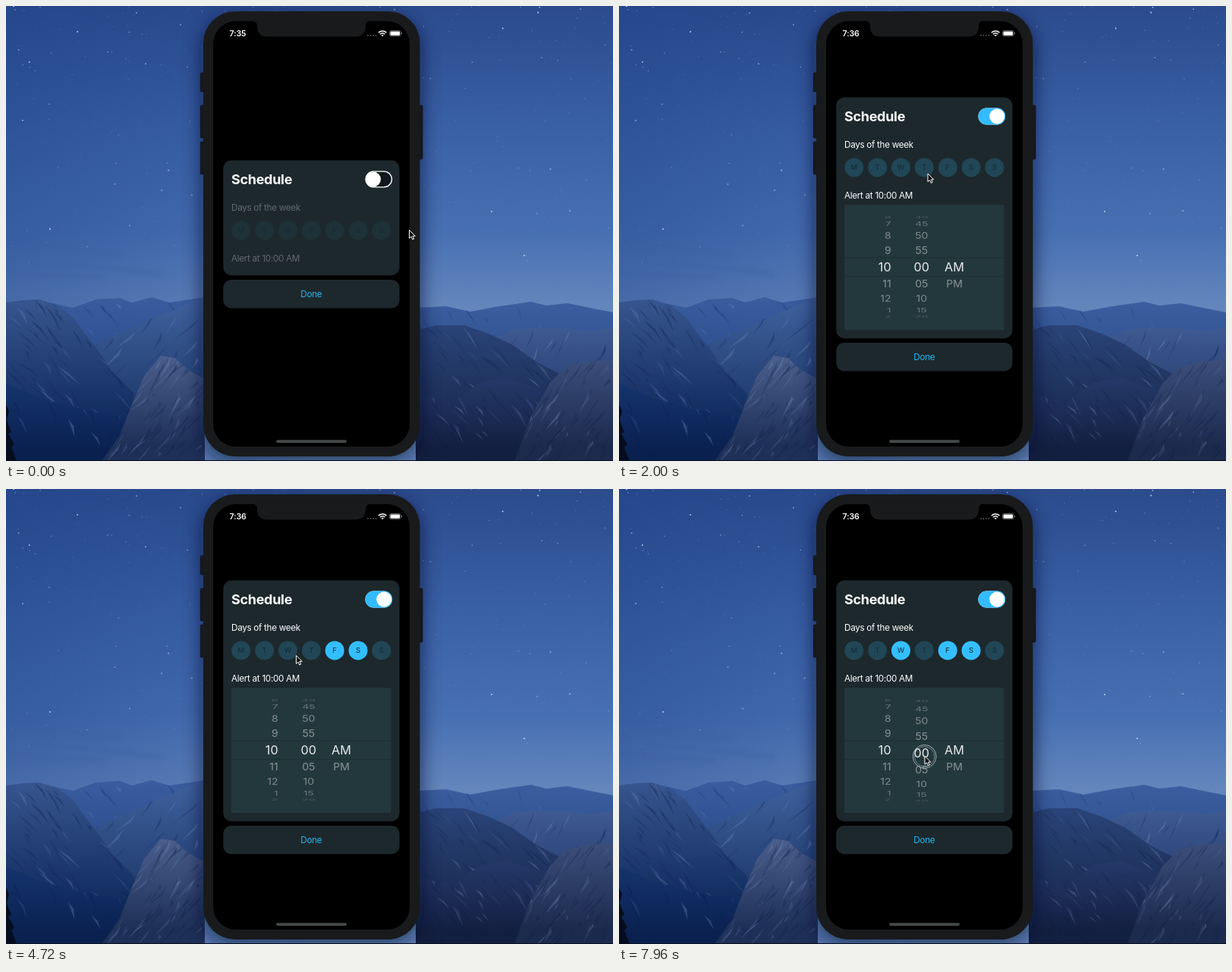
These frames come from a looping animation (800 by 600 pixels, 8 s). An HTML page:

```html
<!DOCTYPE html>
<html lang="en">
<head>
<meta charset="utf-8">
<title>Schedule card</title>
<style>
  html, body { margin: 0; width: 100%; height: 100%; overflow: hidden; background: #000; }
  svg { display: block; width: 100%; height: 100%; }
  text { font-family: Inter, "Open Sans", sans-serif; }
  .body { font-size: 11.7px; letter-spacing: -.3px; }
  .mid { text-anchor: middle; }
</style>
</head>
<body>
<svg viewBox="0 0 800 600">
  <defs>
    <linearGradient id="sky" x2="0" y2="1">
      <stop offset="0" stop-color="#2b4b8d"/>
      <stop offset=".28" stop-color="#3a61a6"/>
      <stop offset=".5" stop-color="#4770b2"/>
      <stop offset=".66" stop-color="#6486bd"/>
    </linearGradient>
    <linearGradient id="dusk">
      <stop offset="0" stop-color="#1d4088" stop-opacity=".4"/>
      <stop offset=".5" stop-color="#1d4088" stop-opacity="0"/>
    </linearGradient>
    <filter id="soft" x="-30%" y="-30%" width="160%" height="160%"><feGaussianBlur stdDeviation="12"/></filter>
    <filter id="haze" x="-30%" y="-100%" width="160%" height="300%"><feGaussianBlur stdDeviation="3"/></filter>
    <clipPath id="pickClip"><rect id="pickClipBox" x="297" y="141.5" width="210.5" height="165" rx="3"/></clipPath>
  </defs>

  <rect width="800" height="600" fill="url(#sky)"/>
  <rect width="800" height="600" fill="url(#dusk)"/>
  <g id="stars" fill="#dce8fb"></g>
  <g fill="none" stroke="#3c5f9f" stroke-width="5" opacity=".5" filter="url(#haze)">
    <path d="M0 316Q60 314 150 330M40 338Q120 342 205 354M0 350Q60 356 130 357"/>
  </g>
  <g id="hills"></g>
  <path d="M0 526l4 8-3 12 6 16-4 2 8 14-4 4 7 18H0Z" fill="#060d1f"/>
  <rect y="599" width="800" height="1" fill="#0a1020"/>

  <rect x="257" y="14" width="291" height="588" rx="44" fill="#04102c" opacity=".6" filter="url(#soft)"/>
  <g fill="#17191c" stroke="#0b0c0e" stroke-width=".6">
    <rect x="256.3" y="88" width="8" height="25" rx="1.5"/>
    <rect x="256.3" y="131" width="8" height="43" rx="1.5"/>
    <rect x="256.3" y="179" width="8" height="43" rx="1.5"/>
    <rect x="541" y="131" width="8" height="71" rx="1.5"/>
  </g>
  <rect x="260" y="7" width="285.5" height="587" rx="42" fill="#191a1b"/>
  <rect x="273" y="20" width="259" height="561" rx="30"/>
  <path d="M325 19.5q6 1 6 7q0 14 14 14H460q14 0 14-14q0-6 6-7Z" fill="#191a1b"/>

  <text id="clock" x="294.5" y="39.8" fill="#fff" font-size="10.6" font-weight="600" letter-spacing="-.1"></text>
  <g fill="#666b6d">
    <circle cx="477" cy="38.8" r=".9"/><circle cx="480.5" cy="38.8" r=".9"/>
    <circle cx="484" cy="38.8" r=".9"/><circle cx="487.5" cy="38.8" r=".9"/>
  </g>
  <g fill="none" stroke="#fff" stroke-width="1.5">
    <path d="M491 35.1a7.3 7.3 0 0 1 10.4 0M493 37.2a4.5 4.5 0 0 1 6.4 0"/>
    <path d="M494.6 38.6a2.3 2.3 0 0 1 3.2 0L496.2 40.3Z" fill="#fff" stroke="none"/>
  </g>
  <rect x="505.5" y="32.4" width="14.6" height="7.4" rx="2.2" fill="none" stroke="#8a8d8e" stroke-width=".7"/>
  <rect x="506.5" y="33.4" width="12.6" height="5.4" rx="1.3" fill="#fff"/>
  <rect x="520.9" y="34.9" width="1" height="2.4" rx=".5" fill="#8a8d8e"/>
  <rect x="356" y="572.3" width="93" height="3.6" rx="1.8" fill="#46494a"/>

  <g id="card">
    <rect id="panel" x="286.3" width="232.3" rx="10.5" fill="#1d282c"/>
    <text x="297" y="31.4" fill="#fff" font-size="18" font-weight="700" letter-spacing="-.3">Schedule</text>
    <rect x="474.1" y="14.6" width="34.4" height="20.6" rx="10.3" fill="#10181b" stroke="#fff" stroke-width="1.3"/>
    <rect id="track" x="473.5" y="14" width="35.6" height="21.8" rx="10.9" fill="#33bbff"/>
    <circle id="knob" cy="24.9" r="10" fill="#fff"/>
    <g id="content">
      <text class="body" x="297" y="66.7" fill="#fff">Days of the week</text>
      <g id="days"></g>
      <text class="body" x="297" y="133" fill="#fff">Alert at 10:00 AM</text>
    </g>
    <g id="picker" clip-path="url(#pickClip)">
      <rect x="297" y="141.5" width="210.5" height="165" fill="#23383d"/>
      <g id="wheel">
        <path d="M297 211.5H507.5M297 236H507.5" stroke="#1b2c30" stroke-width=".8"/>
      </g>
    </g>
    <g id="done">
      <rect x="286.3" width="232.3" height="37.4" rx="10.5" fill="#1d282c"/>
      <text class="body mid" x="402.3" y="22.9" fill="#22b8f6">Done</text>
    </g>
  </g>

  <g id="ring" fill="none" stroke="#c9d2d4" stroke-width="1">
    <circle r="15.4" opacity=".75"/>
    <circle r="13.2" opacity=".5"/>
  </g>
  <path id="cursor" d="M0 0V10.8L2.6 8.5 4.3 12.4 6.2 11.6 4.5 7.8H7.8Z" fill="#0b0b0b" stroke="#fff" stroke-width="1" stroke-linejoin="round"/>
</svg>
<script>
const LOOP = 8000;
const $ = id => document.getElementById(id);
const clamp = v => Math.max(0, Math.min(1, v));
const smooth = v => { v = clamp(v); return v * v * (3 - 2 * v); };
const lerp = (a, b, u) => a + (b - a) * u;
const phase = (t, start, dur) => smooth((t - start) / dur);

function add(parent, tag, attrs, text) {
  const el = document.createElementNS("http://www.w3.org/2000/svg", tag);
  for (const k in attrs) el.setAttribute(k, attrs[k]);
  if (text) el.textContent = text;
  return parent.appendChild(el);
}

let seed = 41;
const rnd = () => (seed = seed * 16807 % 2147483647) / 2147483647;

// Scenery
for (let i = 0; i < 430; i++) {
  const y = 340 * Math.pow(rnd(), 1.35), big = rnd() ** 5;
  add($("stars"), "circle", {
    cx: (800 * rnd()).toFixed(1), cy: y.toFixed(1), r: (.45 + .75 * big).toFixed(2),
    opacity: ((.25 + .35 * rnd() + .4 * big) * (1 - y / 560)).toFixed(2)
  });
}
for (const [cx, cy] of [[58, 294], [683, 329], [640, 271]])
  add($("stars"), "circle", { cx, cy, r: 1, opacity: .8 });

// Each hill: outline, top and bottom colour, streak count, streak slant
const hills = [
  ["0,392 45,388 88,398 118,387 150,385 166,391 192,384 215,391 262,384 262,600 0,600", "#3a5d9f", "#1d3c7a", 30, .6],
  ["540,398 580,396 612,403 650,396 692,390 712,395 740,392 800,404 800,600 540,600", "#3b5e9f", "#223f79", 30, .5],
  ["96,458 130,440 168,424 196,410 226,399 262,383 262,600 140,600", "#40629f", "#16305f", 60, -.9],
  ["640,440 668,427 700,424 740,425 770,429 800,424 800,600 640,600", "#3e5a92", "#1b2f5d", 45, -.7],
  ["0,391 22,388 44,387 70,396 88,410 104,432 124,458 140,482 168,510 190,600 0,600", "#37558f", "#0b2556", 120, .8],
  ["540,428 566,421 604,421 636,432 668,447 700,470 740,490 740,600 540,600", "#2a4478", "#152549", 90, .8],
  ["0,498 40,515 84,528 130,538 170,545 170,600 0,600", "#15346d", "#0a2150", 20, .4],
  ["540,512 590,522 626,496 660,490 700,504 730,520 760,600 540,600", "#25396a", "#131f40", 70, .7],
  ["690,545 716,498 738,476 766,469 800,466 800,600 670,600", "#3c4f7b", "#1c2a4d", 80, -.8],
  ["126,600 150,566 168,520 182,488 204,461 222,464 240,480 262,492 262,600", "#4a5f8d", "#1e3057", 110, -.9]
];
hills.forEach(([points, top, bottom, count, slant], i) => {
  const g = $("hills"), xy = points.split(" ").map(p => p.split(",").map(Number));
  const xs = xy.map(p => p[0]), x0 = Math.min(...xs), x1 = Math.max(...xs);
  const y0 = Math.min(...xy.map(p => p[1]));
  const grad = add(g, "linearGradient", { id: "hill" + i, x2: 0, y2: 1 });
  add(grad, "stop", { offset: 0, "stop-color": top });
  add(grad, "stop", { offset: .85, "stop-color": bottom });
  add(add(g, "clipPath", { id: "edge" + i }), "polygon", { points });
  add(g, "polygon", { points, fill: `url(#hill${i})` });
  const streaks = add(g, "g", { "clip-path": `url(#edge${i})` });
  for (let k = 0; k < count; k++) {
    const len = 8 + 26 * rnd(), x = lerp(x0, x1, rnd()), y = lerp(y0, 590, rnd() ** 1.4);
    const lean = slant * len * (.5 + rnd()), w = 1.5 + 5 * rnd();
    add(streaks, "path", {
      d: `M${x.toFixed(1)} ${y.toFixed(1)}l${(lean * .4 + w).toFixed(1)} ${(len * .4).toFixed(1)} ${(lean * .6 - w * .5).toFixed(1)} ${(len * .6).toFixed(1)}Z`,
      fill: k % 3 ? "#0a1c46" : "#7f9bcd", opacity: (.1 + .22 * rnd()).toFixed(2)
    });
  }
});

// Weekday buttons
const ON = { 2: [5840], 3: [2200, 4320], 4: [2640], 5: [3080] };
const days = [..."MTWTFSS"].map((letter, i) => {
  const cx = 309.8 + 30.85 * i;
  const disc = add($("days"), "circle", { cx, cy: 92.3, r: 12.5, fill: "#33bfff" });
  add($("days"), "text", { x: cx, y: 95.8, class: "mid", "font-size": 9.6, fill: "#0f2a36" }, letter);
  return { disc, on: ON[i] || [] };
});

// Time wheel: rows sit on a cylinder seen from the front
const STEP = 19 * Math.PI / 180, RADIUS = 67.7, MIDDLE = 223.8;
const FADE = [.9, .46, .42, .32, .18];
const pad = n => String(n).padStart(2, "0");
const rows = [];
const addRow = (x, anchor, slot, label, col) => rows.push({
  x, slot, col, el: add($("wheel"), "text", { "text-anchor": anchor, fill: "#fff" }, label)
});
for (let k = -4; k <= 4; k++) {
  addRow(358.6, "end", k, String((9 + k + 12) % 12 + 1), "hour");
  addRow(398.8, "middle", k, pad((k * 5 + 60) % 60), "min");
}
addRow(442, "middle", 0, "AM", "half");
addRow(442, "middle", 1, "PM", "half");

function placeRow(row, shift) {
  const a = row.slot * STEP + shift, n = Math.abs(a / STEP);
  const near = n < .5, squash = Math.max(0, Math.cos(a)), size = near ? 16.2 : 14;
  const y = MIDDLE + RADIUS * Math.sin(a);
  row.el.setAttribute("font-size", size);
  row.el.setAttribute("opacity", FADE[Math.min(4, Math.round(n))]);
  row.el.setAttribute("transform", `translate(${row.x} ${y.toFixed(2)}) scale(1 ${squash.toFixed(3)}) translate(0 ${size * .364})`);
}

// Pointer stops: time, x, y
const PATH = [
  [0, 531.5, 295.5], [240, 531.5, 295.5], [800, 490.5, 229], [1360, 490.5, 229],
  [1900, 407, 221], [2300, 407, 221], [2540, 437, 221], [2740, 437, 221],
  [2980, 467, 221], [3220, 467, 221], [3720, 394, 220], [4480, 394, 220],
  [5000, 368, 219], [6040, 368, 219], [6680, 401, 296], [7000, 401, 296],
  [7560, 402, 344], [7660, 402, 344], [7960, 403, 352.3], [8000, 403, 352.6]
];
const PRESS = [[930, 1040], [2130, 2230], [2580, 2680], [3020, 3120], [4250, 4350], [5770, 5870], [7620, 8000]];

function pointer(t) {
  const i = PATH.findIndex(p => p[0] > t), a = PATH[i - 1], b = PATH[i];
  const u = smooth((t - a[0]) / (b[0] - a[0]));
  return [lerp(a[1], b[1], u), lerp(a[2], b[2], u)];
}

function draw(t) {
  const open = phase(t, 1027, 400), flip = phase(t, 1000, 300);
  const height = 151.6 + 166 * open;
  $("clock").textContent = t < 600 ? "7:35" : "7:36";
  $("card").setAttribute("transform", `translate(0 ${lerp(203.6, 120.6, open)})`);
  $("panel").setAttribute("height", height);
  $("done").setAttribute("transform", `translate(0 ${height + 5.8})`);
  $("track").setAttribute("opacity", clamp(flip * 1.3));
  $("knob").setAttribute("cx", lerp(484, 498.2, flip));
  $("content").setAttribute("opacity", lerp(.3, 1, open));
  $("pickClipBox").setAttribute("height", 165.5 * open);
  $("picker").setAttribute("opacity", clamp(open * 1.6));
  $("wheel").setAttribute("opacity", open * open);

  for (const { disc, on: [start, end] } of days) {
    const lit = start ? phase(t, start, 160) - (end ? phase(t, end, 160) : 0) : 0;
    disc.setAttribute("opacity", lerp(.2, 1, lit));
  }

  const [x, y] = pointer(t);
  const drag = t > 7600 ? Math.max(0, y - 348.7) / RADIUS : 0;
  for (const row of rows) placeRow(row, row.col === "min" ? drag : 0);

  $("cursor").setAttribute("transform", `translate(${x} ${y})`);
  $("ring").setAttribute("transform", `translate(${x - .3} ${y + .5})`);
  $("ring").setAttribute("visibility", PRESS.some(([a, b]) => t >= a && t < b) ? "visible" : "hidden");
}

const begin = performance.now();
function tick() {
  draw((performance.now() - begin) % LOOP);
  requestAnimationFrame(tick);
}
tick();
</script>
</body>
</html>
```
